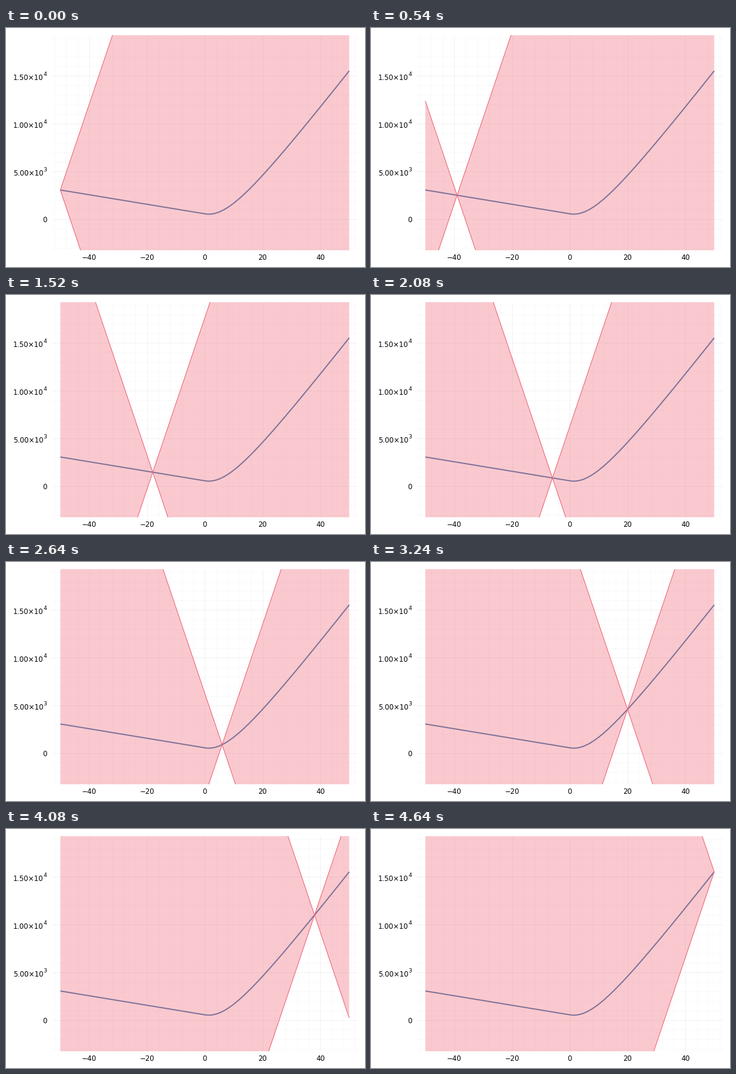
A matplotlib script that plays this animation: 600x400 px, repeating every 4660 ms.

```python
import numpy as np
import matplotlib.pyplot as plt
from matplotlib.animation import FuncAnimation
from matplotlib.patches import Polygon

WIDTH, HEIGHT, DPI = 600, 400, 100
PX = 72 / DPI
BLUE, RED = "#4477AA", "#EE6677"
X_MIN, X_MAX = -50, 50
SLOPE = 900
FRAMES, INTERVAL = 233, 20


def curve(x):
    """Straight falling line, joined at zero by a rising hyperbola."""
    right = np.maximum(x, 0)
    return 545 - 50 * x + 443 * (np.sqrt(right**2 + 11.9**2) - 11.9)


plt.rcParams["font.family"] = "DejaVu Sans"
fig = plt.figure(figsize=(WIDTH / DPI, HEIGHT / DPI), dpi=DPI, facecolor="white")

left, right, top, bottom = 76.3, 588.1, 11.8, 371.5
ax = fig.add_axes([left / WIDTH, 1 - bottom / HEIGHT,
                   (right - left) / WIDTH, (bottom - top) / HEIGHT])
ax.axis("off")

xs = np.linspace(X_MIN, X_MAX, 401)
ys = curve(xs)
margin = 0.25 * (ys.max() - ys.min())
x_lim = (-53, 53)
y_lim = (ys.min() - margin, ys.max() + margin)


def grid(x_ticks, y_ticks, alpha):
    style = dict(colors="black", alpha=alpha, linewidth=PX, zorder=0)
    ax.vlines(x_ticks, *y_lim, **style)
    ax.hlines(y_ticks, *x_lim, **style)


x_ticks = np.arange(-40, 41, 20)
y_ticks = np.arange(0, 15001, 5000)
grid([x for x in range(-52, 53, 4) if x % 20],
     [y for y in range(-3000, 19001, 1000) if y % 5000], 0.025)
grid(x_ticks, y_ticks, 0.055)

ax.plot(xs, ys, color=BLUE, linewidth=2 * PX, solid_capstyle="butt", zorder=1)
cone = ax.add_patch(Polygon([(0, 0)] * 3, closed=True, facecolor=RED,
                            alpha=0.35, linewidth=0, zorder=2))
bounds = [ax.plot([], [], color=RED, linewidth=1.1 * PX,
                  solid_capstyle="butt", zorder=3)[0] for _ in range(2)]
ax.set_xlim(*x_lim)
ax.set_ylim(*y_lim)


def label(x, y, text, size=11.6, ha="center"):
    fig.text(x / WIDTH, 1 - y / HEIGHT, text, fontsize=size * PX,
             ha=ha, va="center_baseline", color="black")


def to_px(x, y):
    px = left + (x - x_lim[0]) / (x_lim[1] - x_lim[0]) * (right - left)
    py = bottom - (y - y_lim[0]) / (y_lim[1] - y_lim[0]) * (bottom - top)
    return px, py


for x in x_ticks:
    label(to_px(x, 0)[0], 383.3, str(x).replace("-", "\u2212"))

for y, base, power in zip(y_ticks, ("0", "5.00", "1.00", "1.50"), ("", "3", "4", "4")):
    row = to_px(0, y)[1]
    if power:
        label(62.6, row + 1.8, base + "\u00d710", ha="right")
        label(68.4, row - 3.6, power, size=9.3, ha="right")
    else:
        label(68.6, row + 0.3, base, ha="right")


def apex_x(frame):
    """Three unit steps every seven ticks; the middle one is held for five."""
    cycle, tick = divmod(frame, 7)
    step = 0 if tick == 0 else 2 if tick == 6 else 1
    if frame == FRAMES - 1:
        step = 1
    return X_MIN + 3 * cycle + step


def update(frame):
    x0 = apex_x(frame)
    y0 = curve(x0)
    rise_l, rise_r = SLOPE * (x0 - X_MIN), SLOPE * (X_MAX - x0)
    cone.set_xy([(X_MIN, y0 + rise_l), (x0, y0), (X_MAX, y0 + rise_r),
                 (X_MAX, y0 - rise_r), (x0, y0), (X_MIN, y0 - rise_l)])
    for line, sign in zip(bounds, (1, -1)):
        line.set_data([X_MIN, x0, X_MAX],
                      [y0 - sign * rise_l, y0, y0 + sign * rise_r])
    return [cone, *bounds]


anim = FuncAnimation(fig, update, frames=FRAMES, interval=INTERVAL,
                     repeat=True, repeat_delay=0, blit=False)
plt.show()
```
